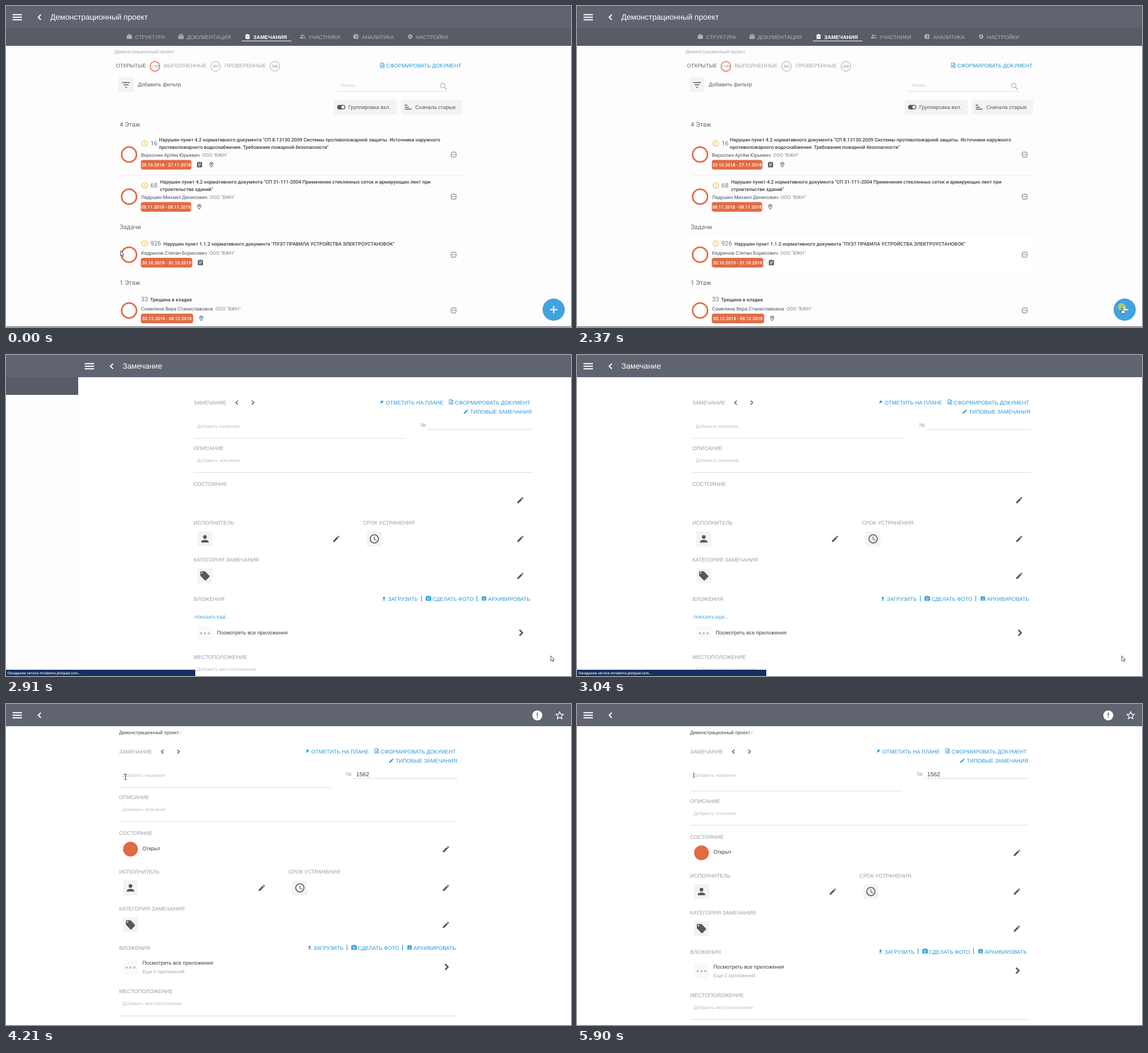
An HTML page that plays this animation: 994x564 px, repeating every 5930 ms.

```html
<!DOCTYPE html>
<html lang="ru">
<head>
<meta charset="utf-8">
<style>
  html, body { margin: 0; width: 100%; height: 100%; overflow: hidden; background: #fff; }
  svg { display: block; width: 994px; height: 564px; }
  text { font-family: "Liberation Sans", Arial, sans-serif; white-space: pre; text-rendering: geometricPrecision; }
  .r { font-family: Roboto, "Open Sans", sans-serif; }
  .m { font-family: Roboto, "Open Sans", sans-serif; font-weight: 500; }
  .b { font-weight: bold; }
  .s { font-family: "Open Sans", "Noto Sans", sans-serif; font-weight: 600; }
</style>
</head>
<body>
<svg id="stage" viewBox="0 0 994 564"></svg>
<script>
const LOOP = 5930;
const ORANGE = '#e16b45', BLUE = '#2798d8', DARK = '#555763', INK = '#3c3e49', GREY = '#9b9da6',
  PALE = '#bfc0c5', BOX = '#f3f3f4', HEAD = '#606471', LINE = '#dcdcdf', TAB = '#afb1b8';

const ICONS = {
  edit: 'M3 17.25V21h3.75L17.81 9.94l-3.75-3.75zM20.71 7.04a1 1 0 0 0 0-1.41l-2.34-2.34a1 1 0 0 0-1.41 0l-1.83 1.83 3.75 3.75z',
  person: 'M12 12a4 4 0 1 0 0-8 4 4 0 0 0 0 8zm0 2c-2.67 0-8 1.34-8 4v2h16v-2c0-2.66-5.33-4-8-4z',
  clock: 'M12 2a10 10 0 1 0 0 20 10 10 0 0 0 0-20zm0 18a8 8 0 1 1 0-16 8 8 0 0 1 0 16zm.5-13H11v6l5.25 3.15.75-1.23-4.5-2.67z',
  tag: 'M21.4 11.6l-9-9A2 2 0 0 0 11 2H4a2 2 0 0 0-2 2v7a2 2 0 0 0 .6 1.4l9 9a2 2 0 0 0 2.8 0l7-7a2 2 0 0 0 0-2.8zM5.5 7a1.5 1.5 0 1 1 0-3 1.5 1.5 0 0 1 0 3z',
  place: 'M12 2a7 7 0 0 0-7 7c0 5.25 7 13 7 13s7-7.75 7-13a7 7 0 0 0-7-7zM12 4a5 5 0 0 0-5 5c0 2.9 2.9 7.2 5 9.9 2.1-2.7 5-7 5-9.9a5 5 0 0 0-5-5zM12 6.5a2.5 2.5 0 1 1 0 5 2.5 2.5 0 0 1 0-5z',
  task: 'M19 3h-4.2a3 3 0 0 0-5.6 0H5a2 2 0 0 0-2 2v14a2 2 0 0 0 2 2h14a2 2 0 0 0 2-2V5a2 2 0 0 0-2-2zM7 7h10v2H7zM7 11h10v2H7zM7 15h7v2H7z',
  bag: 'M20 6h-4V4a2 2 0 0 0-2-2h-4a2 2 0 0 0-2 2v2H4a2 2 0 0 0-2 2v11a2 2 0 0 0 2 2h16a2 2 0 0 0 2-2V8a2 2 0 0 0-2-2zM10 4h4v2h-4z',
  tray: 'M5 3h14v3H5zM2 8h20v11a2 2 0 0 1-2 2H4a2 2 0 0 1-2-2zM8 12h8v2H8z',
  note: 'M4 4h5V2h6v2h5v18H4zM11 8h2v6h-2zM11 16h2v2h-2z',
  people: 'M16 11a3 3 0 1 0 0-6 3 3 0 0 0 0 6zM8 11a3.5 3.5 0 1 0 0-7 3.5 3.5 0 0 0 0 7zM8 13c-2.3 0-7 1.2-7 3.5V19h14v-2.5C15 14.2 10.3 13 8 13zM16 13c1.2.9 2 2 2 3.5V19h5v-2.5c0-2.3-4.7-3.5-7-3.5z',
  pie: 'M11 2v20A10 10 0 0 1 11 2zM13 2v9h9A10 10 0 0 0 13 2zM13 13v9a10 10 0 0 0 9-9z',
  doc: 'M14 2H6a2 2 0 0 0-2 2v16a2 2 0 0 0 2 2h12a2 2 0 0 0 2-2V8zM6 4h7v5h5v11H6zM8 12h8v2H8zM8 16h8v2H8z',
  pushpin: 'M13 3l8 8-3 1-3 3-1 4-4-4-6 6-1-1 6-6-4-4 4-1 3-3z',
  upload: 'M5 20h14v-2H5zM12 3l-7 7h4v6h6v-6h4z',
  camera: 'M9 2L7.2 4H4a2 2 0 0 0-2 2v12a2 2 0 0 0 2 2h16a2 2 0 0 0 2-2V6a2 2 0 0 0-2-2h-3.2L15 2zM12 17a5 5 0 1 1 0-10 5 5 0 0 1 0 10zM12 9a3 3 0 1 0 0 6 3 3 0 0 0 0-6z',
  archive: 'M3 3h18v18H3zM8 11h3V7h2v4h3l-4 4zM6 17h12v1.5H6z',
  star: 'M22 9.24l-7.19-.62L12 2 9.19 8.63 2 9.24l5.46 4.73L5.82 21 12 17.27 18.18 21l-1.63-7.03zM12 15.4l-3.76 2.27 1-4.28-3.32-2.88 4.38-.38L12 6.1l1.71 4.04 4.38.38-3.32 2.88 1 4.28z'
};

const text = (x, y, s, fill = GREY, size = 9.33, cls = '', anchor = 'start') =>
  `<text x="${x}" y="${y}" class="${cls}" fill="${fill}" text-anchor="${anchor}" style="font-size:${size}px">${s}</text>`;
const rect = (x, y, w, h, fill, r = 0) => `<rect x="${x}" y="${y}" width="${w}" height="${h}" rx="${r}" fill="${fill}"/>`;
const disc = (x, y, r, fill, stroke = 'none', w = 1) =>
  `<circle cx="${x}" cy="${y}" r="${r}" fill="${fill}" stroke="${stroke}" stroke-width="${w}"/>`;
const path = (d, stroke, w = 1) => `<path d="${d}" fill="none" stroke="${stroke}" stroke-width="${w}"/>`;
const icon = (name, x, y, size, fill = DARK) =>
  `<path transform="translate(${x - size / 2} ${y - size / 2}) scale(${size / 24})" d="${ICONS[name]}" fill="${fill}" fill-rule="evenodd"/>`;
const group = (id, s) => `<g id="${id}">${s}</g>`;

const header = () => rect(0, 0, 994, 39, HEAD) +
  path('M11.5 15.3h16.5M11.5 19.8h16.5M11.5 24.3h16.5', '#fff', 1.9) + path('M61.3 15.3L56.7 19.8l4.6 4.5', '#fff', 2);
const docLink = (x, y) => icon('doc', x - 7, y - 4, 11, BLUE) + text(x, y, 'СФОРМИРОВАТЬ ДОКУМЕНТ', BLUE);

// List page
function item(cy, num, tx, lines, name, dates, w, icons, warn = true) {
  const two = lines.length > 1, by = cy + (two ? 9.5 : 5.5);
  return disc(216.5, cy, 13.1, '#fff', ORANGE, 2.8) +
    (warn ? disc(244, cy - 19.7, 4.8, 'none', '#f0bd3a', 1.2) + rect(243.4, cy - 22.4, 1.2, 3.4, '#f0bd3a') +
      rect(243.4, cy - 18.3, 1.2, 1.2, '#f0bd3a') : '') +
    text(warn ? 254 : 237.5, cy - 15.7, num, '#777983', 11.2, 'r') +
    lines.map((s, i) => text(tx, cy + (two ? -23 + 12.5 * i : -16.4), s, INK, 8.53, 'm')).join('') +
    text(237.5, cy + (two ? 4 : .3), `${name}<tspan fill="#85878f">  ООО "ВЖН"</tspan>`, '#50525c', 8.55, 'r') +
    rect(237.2, by, w, 17, ORANGE, 4) + text(237.2 + w / 2, by + 11.4, dates, '#fff', 7.9, 'm', 'middle') +
    icons.map(([n, x]) => icon(n, x, by + 8.5, n == 'task' ? 12 : 11.5)).join('') +
    `<rect x="783.2" y="${cy - 4.3}" width="8.6" height="8.6" rx="2" fill="none" stroke="#666873"/>` +
    [785.4, 787.5, 789.6].map(x => disc(x, cy, .75, '#666873')).join('');
}

const counter = (x, n, color, w) => disc(x, 106, 8.5, '#fff', color, w) + text(x, 108.3, n, '#85878f', 6.3, 'r', 'middle');
const navTab = (name, x, s) => icon(name, x - 10, 53.7, 11, TAB) + text(x, 57.5, s, TAB);

const list = rect(0, 0, 994, 564, '#fdfdfd') + header() + rect(0, 39, 994, 31, '#595b67') +
  text(78, 24, 'Демонстрационный проект', '#fff', 13.65) +
  navTab('bag', 227, 'СТРУКТУРА') + navTab('tray', 318, 'ДОКУМЕНТАЦИЯ') +
  icon('note', 425, 53.7, 10.5, '#fff') + text(435, 57.5, 'ЗАМЕЧАНИЯ', '#fff', 9.2, 'b') + rect(415, 61, 87, 1, '#fff') +
  navTab('people', 532, 'УЧАСТНИКИ') + navTab('pie', 626, 'АНАЛИТИКА') +
  disc(711, 53.7, 2.3, 'none', TAB, 1.9) +
  `<circle cx="711" cy="53.7" r="3.6" fill="none" stroke="${TAB}" stroke-width="1.2" stroke-dasharray="1.6 1.23"/>` +
  text(721, 57.5, 'НАСТРОЙКИ', TAB) +
  text(191, 83, 'Демонстрационный проект', '#a8a9af', 8.37) +
  text(193.5, 108, 'ОТКРЫТЫЕ', '#62646f') + counter(262, 1149, ORANGE, 1.5) +
  text(277.5, 108, 'ВЫПОЛНЕННЫЕ', '#a3a5ad') + counter(368.7, 363, '#a3a5ad', 1) +
  text(384.5, 108, 'ПРОВЕРЕННЫЕ', '#a3a5ad') + counter(473, 268, '#a3a5ad', 1) + docLink(669, 108) +
  rect(198, 125, 26.5, 26, BOX, 1) + path('M204.5 134.5h13.5M207 138.5h8.5M209.8 142.7h3', DARK, 1.5) +
  text(232, 140.5, 'Добавить фильтр', DARK) +
  text(588.5, 142, 'Искать...', '#c6c7cb', 8) + rect(582, 149.5, 196, 1, LINE) +
  disc(768.3, 139.7, 3.9, 'none', '#b5b6bb', 1.4) + path('M771 142.5l4.3 4.3', '#b5b6bb', 1.6) +
  rect(577, 165, 110.5, 26, BOX, 2) + rect(582.5, 173.8, 14.5, 8, DARK, 4) + disc(592.8, 177.8, 2.7, '#fff') +
  text(602, 181, 'Группировка вкл.', DARK) +
  rect(695.5, 165, 107, 26, BOX, 2) + path('M701.5 174.3h4.5M701.5 177.8h7.5M701.5 181.3h12', DARK, 1.5) +
  text(720, 181, 'Сначала старые', DARK) +
  text(200, 212, '4 Этаж', '#666873', 11, 'r') + text(200, 392, 'Задачи', '#666873', 11, 'r') +
  text(200, 490, '1 Этаж', '#666873', 11, 'r') + group('hover', rect(192, 404, 611, 64, '#fff')) +
  rect(202, 297, 601, 1, '#ececee') +
  item(261, 16, 269, ['Нарушен пункт 4.2 нормативного документа "СП 8.13130.2009 Системы противопожарной защиты. Источники наружного',
    'противопожарного водоснабжения. Требования пожарной безопасности"'], 'Верхолин Артём Юрьевич',
    '29.10.2018 - 27.11.2018', 89, [['task', 340.5], ['place', 361.3]]) +
  item(335, 68, 271, ['Нарушен пункт 4.2 нормативного документа "СП 31-111-2004 Применение стеклянных сеток и армирующих лент при',
    'строительстве зданий"'], 'Ладушин Михаил Денисович', '08.11.2018 - 08.11.2018', 88.5, [['place', 340]]) +
  item(437, 926, 277, ['Нарушен пункт 1.1.2 нормативного документа "ПУЭ7 ПРАВИЛА УСТРОЙСТВА ЭЛЕКТРОУСТАНОВОК"'],
    'Кедринов Степан Борисович', '30.10.2019 - 31.10.2019', 90.5, [['task', 342]]) +
  item(535, 33, 253.5, ['Трещина в кладке'], 'Сомелина Вера Станиславовна', '05.12.2018 - 08.12.2018', 92, [['place', 343.5]], false) +
  rect(0, 563, 994, 1, '#66676c') +
  group('fab', disc(963.5, 533.5, 19.5, '#41a3df') + path('M957 533.5h13M963.5 527v13', '#fff', 2));

// Form page
const pencil = (x, y) => icon('edit', x, y, 14.5);
const iconBox = (x, y, name) => rect(x - 13, y - 13, 26, 26, BOX, 1) + icon(name, x, y, 19.5);

const below = rect(199, 146, 373, 1, LINE) + text(199, 167, 'ОПИСАНИЕ') + text(205, 188, 'Добавить описание', PALE, 8.35) +
  rect(199, 206, 595.5, 1, LINE) + text(199, 230, 'СОСТОЯНИЕ') +
  group('state', disc(219, 255, 13, ORANGE) + text(240, 256.5, 'Открыт', INK)) + pencil(774, 255) +
  text(199, 298, 'ИСПОЛНИТЕЛЬ') + text(497, 298, 'СРОК УСТРАНЕНИЯ') +
  iconBox(219, 323, 'person') + pencil(450, 323) + iconBox(517, 323, 'clock') + pencil(774, 323) +
  text(199, 363, 'КАТЕГОРИЯ ЗАМЕЧАНИЯ') + iconBox(219, 388, 'tag') + pencil(774, 388) +
  text(199, 432, 'ВЛОЖЕНИЯ') + icon('upload', 534, 428, 9.5, BLUE) + text(541, 432, 'ЗАГРУЗИТЬ', BLUE) +
  rect(599.4, 423, 1.2, 10, BLUE) + icon('camera', 612.3, 428, 11.5, BLUE) + text(619.5, 432, 'СДЕЛАТЬ ФОТО', BLUE) +
  rect(696.9, 423, 1.2, 10, BLUE) + icon('archive', 710, 428, 10, BLUE) + text(717, 432, 'АРХИВИРОВАТЬ', BLUE) +
  group('showMore', text(201, 463, 'ПОКАЗАТЬ ЕЩЕ...', BLUE, 7.1)) +
  group('tail', rect(206, 450, 26, 26, '#f9f9f9', 1) + [212.3, 219, 225.7].map(x => disc(x, 463, 2, '#bdbec4')).join('') +
    group('viewAll', text(240, 458, 'Посмотреть все приложения', INK)) +
    group('amount', text(240, 473, 'Еще 0 приложений', '#a5a7ae', 8.4)) +
    path('M772.5 457l5 5-5 5', DARK, 2.6) + text(199, 508, 'МЕСТОПОЛОЖЕНИЕ') +
    text(205, 529, 'Добавить местоположение', PALE, 8.35) + rect(199, 547.5, 595.5, 1, LINE));

const form = rect(0, 0, 994, 564, '#fff') + header() +
  group('heading', text(78, 24, 'Замечание', '#fff', 13.65)) +
  group('tools', disc(934.7, 20, 8.8, '#fff') + rect(933.8, 15, 1.8, 6, HEAD) + rect(933.8, 22.6, 1.8, 1.9, HEAD) +
    icon('star', 974, 20, 19.5, '#fff')) +
  group('content',
    group('crumbs', text(199, 53, 'Демонстрационный проект<tspan fill="#a8a9af"> /</tspan>', INK, 8.4)) +
    text(199, 87, 'ЗАМЕЧАНИЕ') + path('M277 80.2l-3.6 3.5 3.6 3.5M301.5 80.2l3.6 3.5-3.6 3.5', DARK, 1.5) +
    icon('pushpin', 530, 82.5, 9, BLUE) + text(537, 86.5, 'ОТМЕТИТЬ НА ПЛАНЕ', BLUE) + docLink(659, 86.5) +
    icon('edit', 678, 99.5, 10, BLUE) + text(685.5, 103, 'ТИПОВЫЕ ЗАМЕЧАНИЯ', BLUE) +
    text(205, 128, 'Добавить название', PALE, 8.35) + text(598, 126, '№', GREY) +
    group('number', text(616, 126.5, '1562', INK, 10.3)) + rect(611, 130, 183.5, 1, LINE) +
    group('below', below) + group('caret', rect(205, 120, 1, 10, '#444')));

const pointer = group('glow', `<g opacity=".65">${disc(-.5, 0, 6.5, '#e3e03a')}</g>`) +
  '<path id="arrow" d="M0 0V9L2.1 7.2 3.5 10.3 4.9 9.7 3.6 6.7H6.2Z" fill="#fff" stroke="#333" stroke-width=".8"/>' +
  '<path id="hand" d="M-.5 2.3Q0 1 1 2.3V6L5 7Q6 7.3 5.6 9L4.8 12H.3L-2.4 8.6Q-2.4 7.4-.5 8.2Z" fill="#fff" stroke="#222" stroke-width=".8"/>' +
  group('beam', path('M-2.2-4.7H2.2M-2.2 4.7H2.2M0-4.7V4.7', '#333', .9));

const stage = document.getElementById('stage');
stage.innerHTML = group('list', list) + group('form', form) +
  group('status', rect(0, 553, 333, 11, '#14305f') + text(2.5, 560.8, 'Ожидание service-mrsdemo.plotpad.com...', '#fff', 6.1, 's')) +
  group('pointer', pointer);

const el = {};
stage.querySelectorAll('[id]').forEach(e => el[e.id] = e);
const show = (id, on) => el[id].setAttribute('visibility', on ? 'inherit' : 'hidden');
const move = (id, x, y) => el[id].setAttribute('transform', `translate(${x} ${y})`);
const part = (t, a, b) => Math.min(1, Math.max(0, (t - a) / (b - a)));
const smooth = p => p * p * (3 - 2 * p);

// Pointer strokes: start, end, then a quadratic curve
const strokes = [
  [20, 640, 201.5, 430, 520, 400, 889.5, 419],
  [1260, 1870, 900, 417.5, 918, 465, 958.5, 528.5],
  [3385, 4000, 958.5, 528.5, 600, 330, 204, 166],
  [4000, 4220, 204, 166, 184, 142, 210.5, 128],
  [4220, 4430, 210.5, 128, 214, 128, 212, 129.5],
  [5590, 5890, 212, 129.5, 130, 150, 24, 225]
];
function pointerAt(t) {
  const [a, b, x0, y0, cx, cy, x1, y1] = strokes.filter(s => t >= s[0]).pop() || strokes[0];
  const p = smooth(part(t, a, b)), q = 1 - p;
  const mix = (u, v, w) => q * q * u + 2 * p * q * v + p * p * w;
  return [mix(x0, cx, x1), mix(y0, cy, y1)];
}

function draw(now) {
  const t = now % LOOP, loaded = t >= 3180;
  const slide = Math.round(994 * (1 - part(t, 2762, 3062)) ** 3);
  move('list', slide - 994, 0);
  move('form', slide, 0);
  show('list', slide > 0);
  show('hover', t >= 60);
  show('fab', t < 2790);
  show('status', t >= 2480 && t < 3180);

  for (const id of ['tools', 'crumbs', 'number', 'state', 'amount']) show(id, loaded);
  for (const id of ['heading', 'showMore']) show(id, !loaded);
  move('content', loaded ? 0 : 4, 0);
  move('tail', 0, loaded ? 0 : 26);
  move('viewAll', 0, loaded ? 0 : 6.5);
  move('below', 0, 6.5 * smooth(part(t, 4590, 4690)));
  show('caret', t >= 4620 && (t - 4620) % 1000 < 500);

  const [x, y] = pointerAt(t);
  const hand = t >= 1890 && t < 2790, beam = t > 4000 && y < 146 && x > 199;
  move('pointer', x, y);
  show('pointer', t < 5890);
  show('hand', hand);
  show('beam', beam);
  show('arrow', !hand && !beam);
  show('glow', t >= 2370 && t < 2480 || t >= 4590 && t < 4690);
  requestAnimationFrame(() => draw(performance.now()));
}
draw(0);
</script>
</body>
</html>
```
